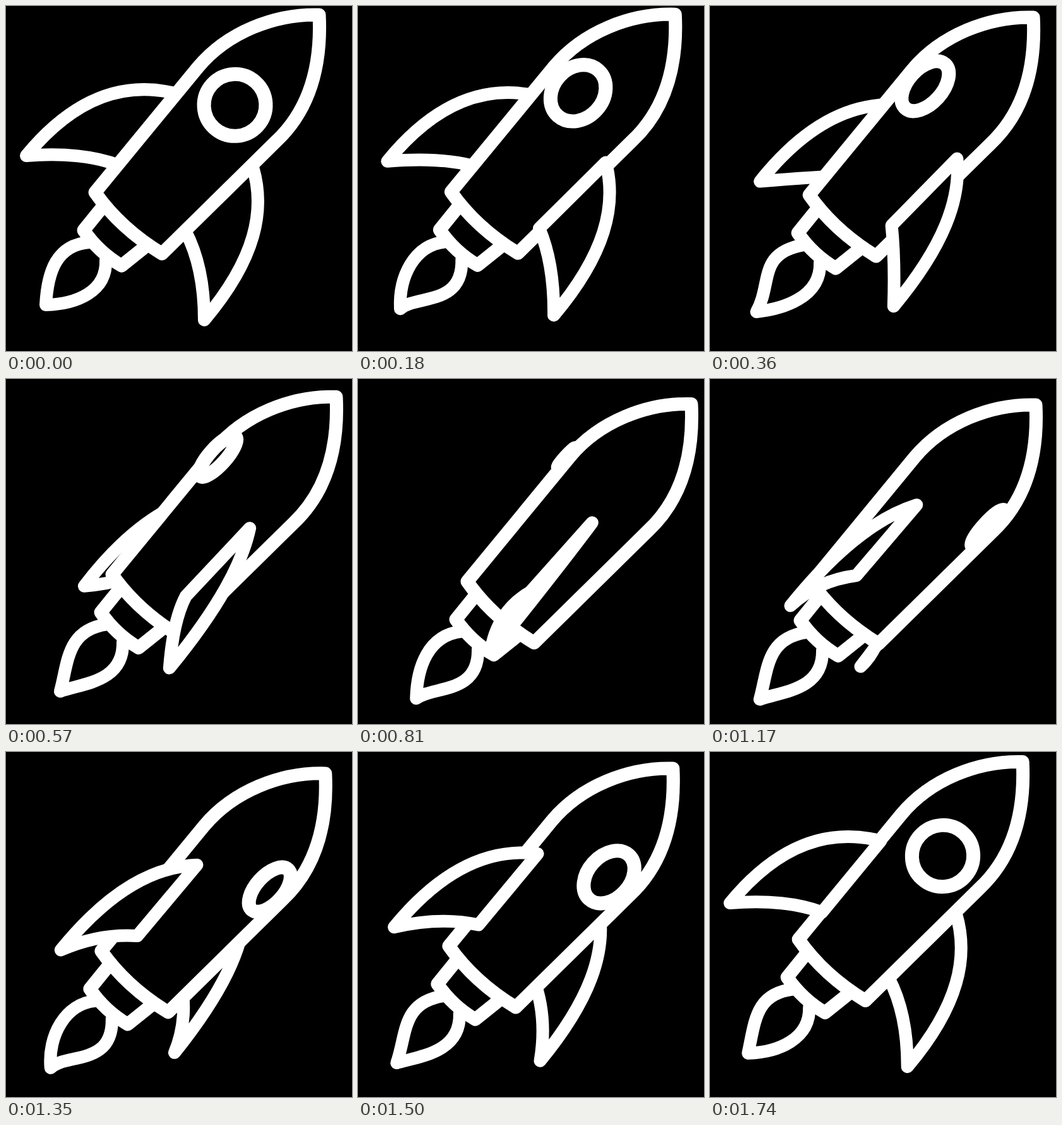
Write an HTML page without scripts that moves like this. It is 548 px wide and 546 px high and loops after 1.77 s.

```html
<!DOCTYPE html>
<html lang="en">
<head>
<meta charset="utf-8">
<title>Spinning rocket</title>
<style>
  @property --turn {
    syntax: "<angle>";
    inherits: true;
    initial-value: 0deg;
  }

  html, body {
    margin: 0;
    width: 100%;
    height: 100%;
    overflow: hidden;
    background: #000;
  }

  svg {
    display: block;
    width: 100%;
    height: 100%;
    fill: #000;
    stroke: #fff;
    stroke-width: 21px;
    stroke-linecap: round;
    stroke-linejoin: round;
    animation: turn 1.77s linear infinite;
  }

  /* The cycle is cut just short of a full turn. */
  @keyframes turn {
    to { --turn: 354deg; }
  }

  .rocket {
    transform: translate(
      calc(16.5px * (cos(20deg) - cos(var(--turn) + 20deg))),
      calc(15.2px * (cos(23deg) - cos(var(--turn) - 23deg))));
  }

  .fin { stroke-width: 20px; }
  .front { animation: front 1.77s infinite; }
  .back { animation: back 1.77s infinite; }

  @keyframes front {
    0% {
      d: path("M390 252C412 322 396 400 314 497C314 440 303 392 284 356Z");
      animation-timing-function: cubic-bezier(.14, 0, .26, 0);
    }
    50.85% {
      d: path("M331 194C288 237 234 297 157 394C164 354 190 323 234 305Z");
      animation-timing-function: cubic-bezier(.705, .921, .866, .994);
    }
    100% { d: path("M271 139C193 119 112 140 32 237C91 232 142 238 178 252Z"); }
  }

  @keyframes back {
    0% {
      d: path("M271 139C193 119 112 140 32 237C91 232 142 238 178 252Z");
      animation-timing-function: cubic-bezier(.14, 0, .26, 0);
    }
    50.85% {
      d: path("M331 194C284 230 226 285 156 383C200 380 226 349 234 305Z");
      animation-timing-function: cubic-bezier(.705, .921, .866, .994);
    }
    100% { d: path("M390 252C412 322 396 400 314 497C314 440 303 392 284 356Z"); }
  }

  .flame {
    stroke-width: 20px;
    animation: flicker 1.77s cubic-bezier(.364, 0, .636, 1) infinite;
  }

  @keyframes flicker {
    0% {
      d: path("M132 374C80 378 66 420 63 473C112 472 160 452 158 402");
      animation-timing-function: cubic-bezier(.61, 1, .88, 1);
    }
    7.1%, 41%, 75% { d: path("M132 374C84 378 56 430 61 480C84 456 160 478 158 402"); }
    24%, 58% { d: path("M132 374C56 388 86 436 57 480C100 478 160 455 158 402"); }
    91.9% {
      d: path("M132 374C56 388 86 436 57 480C100 478 160 455 158 402");
      animation-timing-function: cubic-bezier(.12, 0, .39, 0);
    }
    100% { d: path("M132 374C80 378 66 420 63 473C112 472 160 452 158 402"); }
  }

  .port {
    stroke-width: 22px;
    animation: roll 1.77s infinite, squash 1.77s linear infinite;
  }

  /* Leaves at the left edge, comes back at the right one. */
  @keyframes roll {
    0% { cy: 374.5px; animation-timing-function: cubic-bezier(.61, 1, .88, 1); }
    50.85% { cy: 287px; animation-timing-function: step-end; }
    50.86% { cy: 462px; animation-timing-function: cubic-bezier(.122, 0, .393, 0); }
    100% { cy: 379px; }
  }

  @keyframes squash {
    0% { rx: 49px; ry: 49px; }
    5% { rx: 49px; ry: 46px; }
    20.3% { rx: 47px; ry: 27.5px; }
    32.2% { rx: 42px; ry: 13px; }
    45.8% { rx: 20px; ry: 2px; }
    50.85% { rx: 16px; ry: 1px; }
    66.1% { rx: 38px; ry: 8px; }
    84.7% { rx: 47px; ry: 33.5px; }
    95% { rx: 49px; ry: 47px; }
    100% { rx: 49px; ry: 49px; }
  }
</style>
</head>
<body>
<svg viewBox="0 0 548 546" role="img" aria-label="Rocket">
  <g class="rocket">
    <path class="fin back" d="M271 139C193 119 112 140 32 237C91 232 142 238 178 252Z"/>
    <path class="flame" d="M132 374C80 378 66 420 63 473C112 472 160 452 158 402"/>
    <path d="M153 318L123 355Q147 390 183 411L218 383"/>
    <path d="M141 295L304 97C350 42 425 12 496 14C500 95 480 165 428 214L247 392Q181 352 141 295Z"/>
    <g transform="rotate(-48)">
      <ellipse class="port" cx="126" cy="374.5" rx="49" ry="49"/>
    </g>
    <path class="fin front" d="M390 252C412 322 396 400 314 497C314 440 303 392 284 356Z"/>
  </g>
</svg>
</body>
</html>
```
